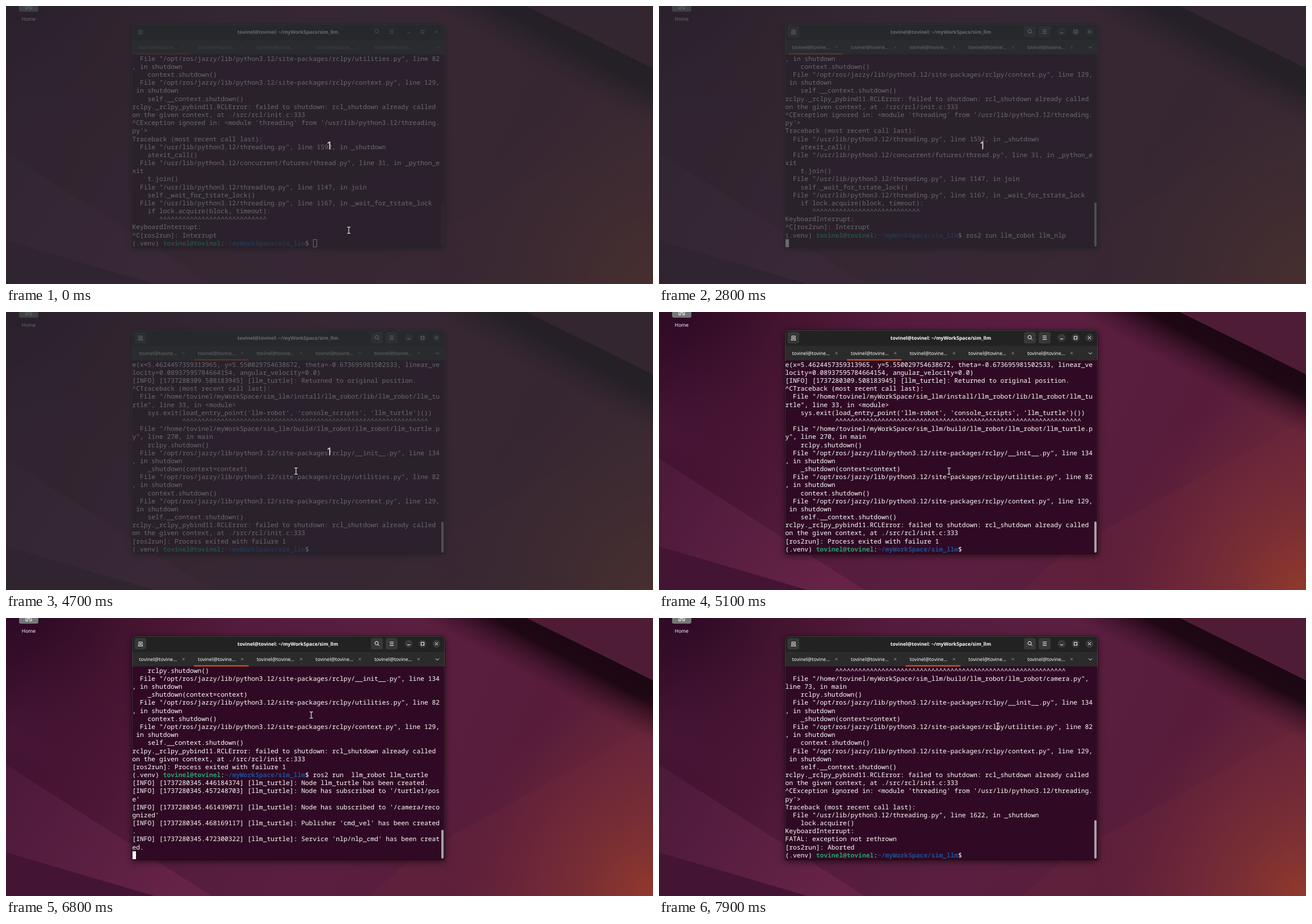
An HTML page for the animation above (8 s loop, 1140 px wide and 491 px high).

```html
<!DOCTYPE html>
<html lang="en">
<head>
<meta charset="utf-8">
<title>Terminal session</title>
<style>
html, body { margin: 0; width: 100%; height: 100%; overflow: hidden; background: #541c3d; }
svg, pre, div { position: absolute; left: 0; top: 0; margin: 0; }
svg text { font: 8.6px "Noto Sans", "Open Sans", sans-serif; fill: #fff; text-rendering: geometricPrecision; }
pre {
  left: 222.5px; top: 86.8px; color: #fff; text-rendering: geometricPrecision;
  font: 11.29px/14.17px "Noto Sans Mono", "DejaVu Sans Mono", monospace;
}
pre b { color: #26a269; }
pre b + b { color: #1d4f97; }
#caret { width: 6.8px; height: 14.2px; top: 412px; box-sizing: border-box; border: 1px solid #fff; }
#dim { width: 1140px; height: 491px; background: rgba(40, 44, 48, .7); }
</style>
</head>
<body>
<svg width="1140" height="491">
  <defs>
    <linearGradient id="base" gradientUnits="userSpaceOnUse" x1="60" y1="0" x2="1140" y2="491">
      <stop offset="0" stop-color="#2e0a25"/><stop offset=".12" stop-color="#43132f"/>
      <stop offset=".27" stop-color="#541b3c"/><stop offset=".5" stop-color="#5a1f40"/>
      <stop offset=".75" stop-color="#581c3a"/><stop offset="1" stop-color="#6c283a"/>
    </linearGradient>
    <radialGradient id="glow" gradientUnits="userSpaceOnUse" cx="1140" cy="491" r="360">
      <stop offset="0" stop-color="#92392c"/><stop offset=".35" stop-color="#84342f" stop-opacity=".6"/>
      <stop offset="1" stop-color="#702838" stop-opacity="0"/>
    </radialGradient>
    <radialGradient id="left" gradientUnits="userSpaceOnUse" cx="0" cy="210" r="230">
      <stop offset="0" stop-color="#5c1e46" stop-opacity=".5"/><stop offset="1" stop-color="#4a1638" stop-opacity="0"/>
    </radialGradient>
    <linearGradient id="wedge" gradientUnits="userSpaceOnUse" x1="1030" y1="55" x2="985" y2="138">
      <stop offset="0" stop-color="#1c0712"/><stop offset=".35" stop-color="#1e0814"/>
      <stop offset="1" stop-color="#3a1026" stop-opacity="0"/>
    </linearGradient>
    <linearGradient id="fold" gradientUnits="userSpaceOnUse" x1="0" y1="300" x2="300" y2="491">
      <stop offset="0" stop-color="#4d1a3b"/><stop offset="1" stop-color="#662347"/>
    </linearGradient>
  </defs>
  <rect width="1140" height="491" fill="url(#base)"/>
  <rect width="1140" height="491" fill="url(#left)"/>
  <path d="M0 259L362 491H0Z" fill="url(#fold)"/>
  <path d="M0 414L262 491H0Z" fill="#431434"/>
  <path d="M1140 190L720 420L640 491H1140Z" fill="#72283e" opacity=".25"/>
  <path d="M700 0H920L1140 110V260Z" fill="url(#wedge)"/>
  <path d="M917 0H1140V110Z" fill="#4f1c36"/>
  <rect width="1140" height="491" fill="url(#glow)"/>

  <path d="M23 0H57V7Q57 10 54 10H26Q23 10 23 7Z" fill="#777"/>
  <path d="M35 0V5H38V1H42V5H45V0" fill="none" stroke="#ddd" stroke-width="1.3"/>
  <text x="40" y="25.5" text-anchor="middle">Home</text>

  <path d="M222 427V39Q222 32 229 32H766Q773 32 773 39V427Z" fill="#300a24"
    stroke="#1a0a14" style="filter:drop-shadow(0 3px 6px rgba(0,0,0,.55))"/>
  <path d="M222 60V39Q222 32 229 32H766Q773 32 773 39V60Z" fill="#222"/>
  <rect x="222" y="60" width="551" height="25.5" fill="#2b2b2b"/>
  <path d="M222.5 427V39Q222.5 32.5 229 32.5H766Q772.5 32.5 772.5 39V427" fill="none" stroke="#fff" opacity=".12"/>
  <g id="pads" fill="#383838">
    <rect x="226.5" y="35.5" width="20.5" height="20" rx="3.5"/>
    <rect x="643" y="35.5" width="21" height="20" rx="3.5"/>
    <rect x="669" y="35.5" width="21" height="20" rx="3.5"/>
    <circle cx="709.5" cy="45.5" r="7"/><circle cx="734" cy="45.5" r="7"/><circle cx="758.5" cy="45.5" r="7"/>
  </g>
  <g id="icons" fill="none" stroke="#fff">
    <path d="M232.5 49.500H241.5M234 49V42.500H240V49M237 44V48M235 46H239" stroke-width=".9"/>
    <circle cx="653" cy="44.5" r="3"/><path d="M655.2 46.7L658 49.5"/>
    <path d="M676 42.5H683M676 45.5H683M676 48.5H683M707 47.5H712"/>
    <rect x="731.5" y="43" width="5" height="5"/>
    <path d="M756 43L761 48M761 43L756 48"/>
  </g>
  <text id="title" x="496.5" y="48.5" text-anchor="middle" style="font-weight:700"></text>
  <g id="tabs"></g>
  <rect id="thumb" x="767" width="4" rx="2" fill="#aaa0a7"/>
</svg>
<pre id="term"></pre>
<div id="caret"></div>
<div id="dim"></div>
<svg width="1140" height="491">
  <text id="count" x="570" y="253" text-anchor="middle" style="font-size:19px;fill:#f2ecd9">1</text>
  <path id="beam" d="M-3 -5.5H-1Q0 -5.5 0 -4.5Q0 -5.5 1 -5.5H3M0 -4.5V4.5M-3 5.5H-1Q0 5.5 0 4.5Q0 5.5 1 5.5H3"
    fill="none" stroke="#eee" stroke-width="1.2" style="filter:drop-shadow(0 0 .7px #000)"/>
  <path id="arrow" d="M0 0V11L2.6 8.6L4.4 12.5L6.2 11.7L4.5 7.9H8Z" fill="#111" stroke="#eee" stroke-width=".9"/>
</svg>
<script>
const $ = id => document.getElementById(id);
const COLS = 80, ROWS = 24, CELL = 6.775;
const user = 'tovinel', host = user + '@' + user, dir = '~/myWorkSpace/sim_llm';
const prompt = `(.venv) ${host}:${dir}$ `;
const home = `/home/${user}/myWorkSpace/sim_llm/`;

const file = (path, line, where) => `  File "${path}", line ${line}, in ${where}`;
const ros = (name, line) => file(`/opt/ros/jazzy/lib/python3.12/site-packages/rclpy/${name}.py`, line, 'shutdown');
const lib = (name, line, where) => file(`/usr/lib/python3.12/${name}.py`, line, where);
const carets = (pad, n) => ' '.repeat(pad) + '^'.repeat(n);
const info = (time, text) => `[INFO] [1737280${time}] [llm_turtle]: ${text}`;

const contextError = [
  ros('utilities', 82), '    context.shutdown()',
  ros('context', 129), '    self.__context.shutdown()',
  'rclpy._rclpy_pybind11.RCLError: failed to shutdown: rcl_shutdown already called on the given context, at ./src/rcl/init.c:333'
];
const shutdownError = ['    rclpy.shutdown()', ros('__init__', 134), '    _shutdown(context=context)', ...contextError];
const ignored = [
  "^CException ignored in: <module 'threading' from '/usr/lib/python3.12/threading.py'>",
  'Traceback (most recent call last):'
];

const nlp = [
  ...contextError, ...ignored,
  lib('threading', 1592, '_shutdown'), '    atexit_call()',
  lib('concurrent/futures/thread', 31, '_python_exit'), '    t.join()',
  lib('threading', 1147, 'join'), '    self._wait_for_tstate_lock()',
  lib('threading', 1167, '_wait_for_tstate_lock'), '    if lock.acquire(block, timeout):',
  carets(7, 28), 'KeyboardInterrupt:', '^C[ros2run]: Interrupt'
];
const turtle = [
  'e(x=5.4624457359313965, y=5.550029754638672, theta=-0.673695981502533, linear_velocity=0.08937595784664154, angular_velocity=0.0)',
  info('309.508183945', 'Returned to original position.'),
  '^CTraceback (most recent call last):',
  file(home + 'install/llm_robot/lib/llm_robot/llm_turtle', 33, '<module>'),
  "    sys.exit(load_entry_point('llm-robot', 'console_scripts', 'llm_turtle')())",
  carets(13, 64),
  file(home + 'build/llm_robot/llm_robot/llm_turtle.py', 270, 'main'),
  ...shutdownError, '[ros2run]: Process exited with failure 1'
];
const turtleLog = [
  info('345.446184374', 'Node llm_turtle has been created.'),
  info('345.457248703', "Node has subscribed to '/turtle1/pose'"),
  info('345.461439071', "Node has subscribed to '/camera/recognized'"),
  info('345.468169117', "Publisher 'cmd_vel' has been created."),
  info('345.472300322', "Service 'nlp/nlp_cmd' has been created.")
];
const camera = [
  carets(13, 60), file(home + 'build/llm_robot/llm_robot/camera.py', 73, 'main'),
  ...shutdownError, ...ignored,
  lib('threading', 1622, '_shutdown'), '    lock.acquire()',
  'KeyboardInterrupt:', 'FATAL: exception not rethrown', '[ros2run]: Aborted'
];
const runNlp = prompt + 'ros2 run llm_robot llm_nlp ';
const runTurtle = prompt + 'ros2 run  llm_robot llm_turtle ';

// start time, active tab, top of the scroll thumb, lines
const screens = [
  [0, 0, 347, [...nlp, prompt]],
  [2200, 0, 347, [...nlp, runNlp]],
  [2800, 0, 347, [...nlp, runNlp, '']],
  [4200, 1, 370, [...turtle, prompt]],
  [5500, 1, 370, [...turtle, runTurtle]],
  [5700, 1, 371, [...turtle, runTurtle, '']],
  [6600, 1, 374, [...turtle, runTurtle, ...turtleLog, '']],
  [7300, 2, 357, [...camera, prompt]]
];
const caretOff = [[1100, 1700], [3400, 4000], [4700, 5400], [6200, 6800], [7900, 8000]];

// pointer strokes: time, x, y
const strokes = [
  [[0, 604, 396], [2200, 604, 396]],
  [[3300, 598, 392], [3700, 505, 235], [4100, 388, 71], [4200, 388, 71], [4600, 511, 281], [5500, 511, 281]],
  [[6200, 515, 279], [6400, 579, 243], [6500, 579, 243], [7200, 483, 76], [7300, 483, 76],
    [7400, 496, 103], [7900, 597, 191], [8000, 597, 191]]
];

const escape = s => s.replace(/&/g, '&amp;').replace(/</g, '&lt;');
const wrap = line => line.match(new RegExp(`.{1,${COLS}}`, 'g')) || [''];
const toHtml = lines => escape(lines.flatMap(wrap).slice(-ROWS).join('\n'))
  .replaceAll(host + ':' + dir, `<b>${host}</b>:<b>${dir}</b>`);

$('title').textContent = `${host}: ${dir}`;
for (let i = 0; i < 5; i++) {
  const x = 103.6 * i;
  $('tabs').innerHTML += `<text x="${234.5 + x}" y="75.5">${host.slice(0, -1)}…</text>
    <path d="M${310.7 + x} 70.7l4 4m0 -4l-4 4" stroke="#aaa" stroke-width=".8"/>`;
}
$('tabs').innerHTML += `<path d="M757 71.5l3 3l3 -3" fill="none" stroke="#fff"/>
  <rect id="mark" y="83.5" width="96.5" height="2" fill="#e95420"/>`;

function pointerAt(t) {
  const path = strokes.find(s => t >= s[0][0] && t < s[s.length - 1][0]);
  if (!path) return null;
  const i = path.findIndex(p => p[0] > t);
  const [t0, x0, y0] = path[i - 1], [t1, x1, y1] = path[i];
  const k = (t - t0) / (t1 - t0);
  return [x0 + (x1 - x0) * k, y0 + (y1 - y0) * k];
}

let shown;
function draw(now) {
  const t = Math.floor(now % 8000 / 100) * 100;
  const focus = Math.min(1, Math.max(0, (t - 400) / 300));
  const screen = screens.findLast(s => s[0] <= t);
  const [, tab, top, lines] = screen;
  if (screen !== shown) {
    $('term').innerHTML = toHtml(lines);
    shown = screen;
  }
  $('mark').setAttribute('x', 227.5 + 103.6 * tab);
  $('thumb').setAttribute('y', top);
  $('thumb').setAttribute('height', 425 - top);
  $('thumb').style.opacity = .12 + .88 * focus;
  $('pads').style.opacity = focus;
  $('icons').style.opacity = .6 + .4 * focus;
  $('tabs').style.opacity = .4 + .6 * focus;

  const caret = $('caret').style;
  caret.left = 222.5 + lines[lines.length - 1].length * CELL + 'px';
  caret.background = focus ? '#fff' : 'none';
  caret.visibility = caretOff.some(([a, b]) => t >= a && t < b) ? 'hidden' : 'visible';

  const dimmed = t < 5100 ? 'visible' : 'hidden';
  $('dim').style.visibility = $('count').style.visibility = dimmed;

  const pos = pointerAt(t), inText = pos && pos[1] > 86;
  for (const [id, on] of [['beam', inText], ['arrow', pos && !inText]]) {
    $(id).style.visibility = on ? 'visible' : 'hidden';
    if (on) $(id).setAttribute('transform', `translate(${pos})`);
  }
}

const start = performance.now();
function loop() {
  draw(performance.now() - start);
  requestAnimationFrame(loop);
}
loop();
</script>
</body>
</html>
```
